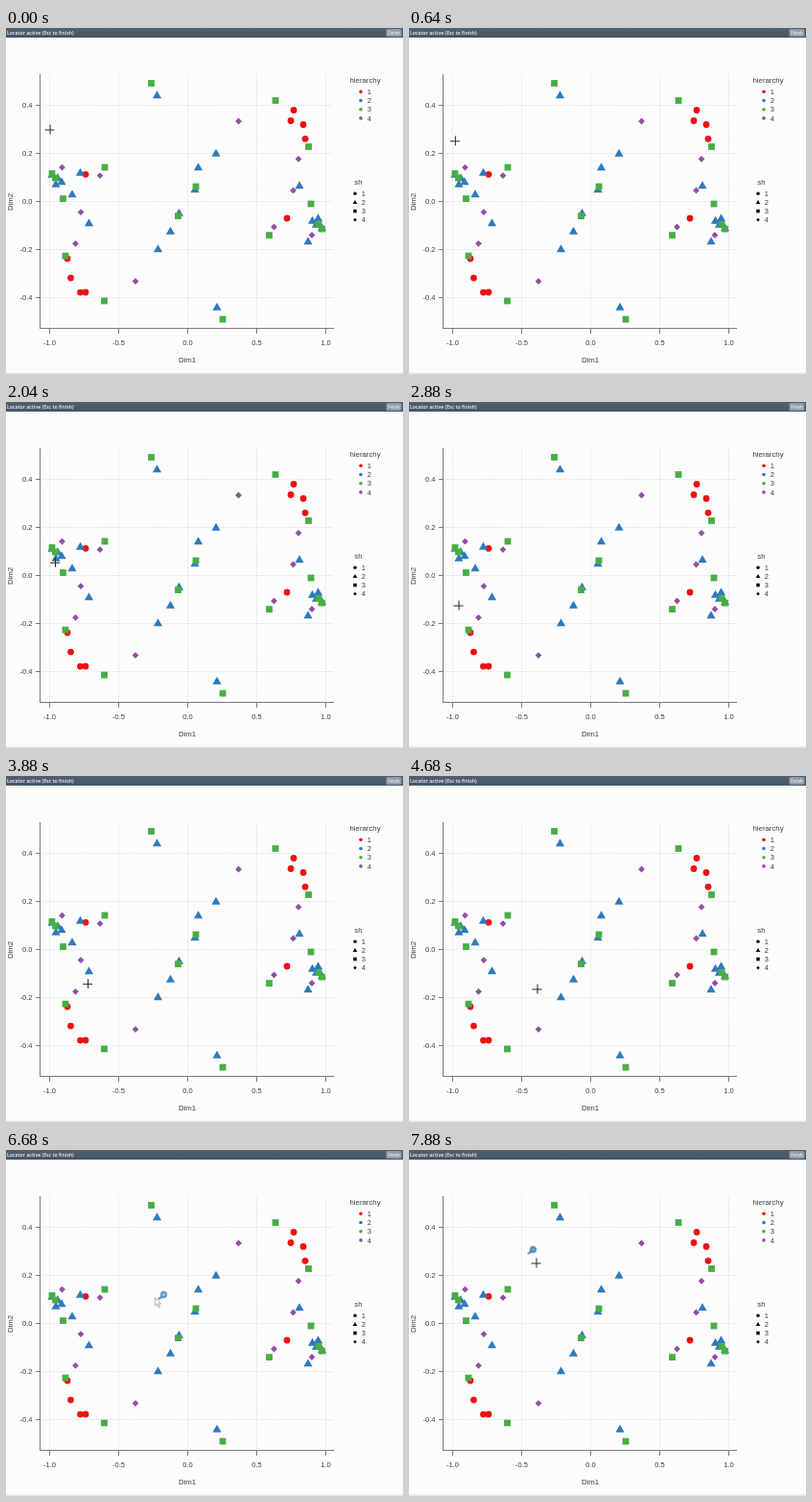
These frames come from a looping animation (414x360 px, 8 s). An HTML page:

```html
<!DOCTYPE html>
<html lang="en">
<head>
<meta charset="utf-8">
<title>Scatter plot locator</title>
<style>
html, body { margin: 0; width: 100%; height: 100%; overflow: hidden; background: #fcfcfc; }
svg { display: block; width: 414px; height: 360px; font: 7.8px "Liberation Sans", Arial, sans-serif; fill: #3c3c3c; }
.bar { font: 600 5.2px "Open Sans", "Noto Sans", sans-serif; fill: #f2f5f8; }
.grid { stroke: #d9d9d9; stroke-width: .8; stroke-dasharray: 1 1; }
.axis { stroke: #7c7c7c; fill: none; }
.mid { text-anchor: middle; }
.end { text-anchor: end; }
.small { font-size: 7.5px; }

#pointer { animation: move 8s linear infinite; }
#cross { stroke: #262626; fill: none; shape-rendering: crispEdges; animation: cross 8s step-end infinite; }
#arrow { fill: #fff; stroke: #808080; stroke-width: .7; animation: arrow 8s step-end infinite; }
#badge { animation: follow 8s linear infinite; }
#badge g { stroke: #2f73b0; stroke-width: 1.3; animation: badge 8s step-end infinite; }

@keyframes move {
  0% { transform: translate(45.5px, 105.5px); }
  17% { transform: translate(50.5px, 130.5px); }
  36% { transform: translate(51.5px, 211.5px); }
  41%, 45.5% { transform: translate(70.5px, 214.5px); }
  58.5%, 63% { transform: translate(133.5px, 221.5px); }
  73% { transform: translate(154.5px, 181.5px); }
  78%, 81.5% { transform: translate(155.5px, 161.5px); }
  83.5% { transform: translate(155.5px, 153.5px); }
  94.5%, 98% { transform: translate(133.5px, 119.5px); }
  98.5%, 100% { transform: translate(132.5px, 117.5px); }
}
@keyframes follow {
  0%, 81.5% { transform: translate(164.5px, 157px); }
  83.5% { transform: translate(164.5px, 150.5px); }
  94.5%, 98% { transform: translate(130px, 105px); }
  98.5%, 100% { transform: translate(129.5px, 103.5px); }
}
@keyframes cross {
  0% { visibility: visible; }
  81.5% { visibility: hidden; }
  92%, 100% { visibility: visible; }
}
@keyframes arrow {
  0% { visibility: hidden; }
  81.5% { visibility: visible; }
  92%, 100% { visibility: hidden; }
}
@keyframes badge {
  0% { visibility: hidden; }
  81.5% { visibility: visible; fill: #9dc0de; }
  92%, 100% { visibility: visible; fill: #6da3d0; }
}
</style>
</head>
<body>
<svg viewBox="0 0 414 360">
  <defs>
    <linearGradient id="title" x2="0" y2="1">
      <stop stop-color="#50606f"/>
      <stop offset="1" stop-color="#465665"/>
    </linearGradient>
  </defs>
  <rect width="414" height="360" fill="#fcfcfc"/>
  <rect width="414" height="10" fill="url(#title)"/>
  <rect y="358.5" width="414" height="1.5" fill="#e3e8ec"/>
  <text class="bar" x="1" y="7">Locator active (Esc to finish)</text>
  <rect x="396.5" y="1" width="16" height="8" rx="1.5" fill="#8f9aa5"/>
  <text class="bar mid" x="404.5" y="6.7" style="font-size:4.4px">Finish</text>

  <g id="plot"></g>
  <text class="mid" x="189" y="348">Dim1</text>
  <text class="mid" transform="translate(6.5 181) rotate(-90)">Dim2</text>
  <text x="358.5" y="57">hierarchy</text>
  <text x="363.3" y="163">sh</text>

  <g id="badge"><g><path d="M-5.5 4.5L-1.5 2" stroke-width="2"/><circle r="2.9"/></g></g>
  <g id="pointer">
    <path id="cross" d="M-5 0H5M0-5V5"/>
    <path id="arrow" d="M0 0V8.5L2 6.8L3.5 10.2L5 9.5L3.5 6.2H6Z"/>
  </g>
</svg>
<script>
// Most points come in pairs that mirror each other through the centre.
const centre = [188.75, 180.3];
const groups = [
  { color: '#ee1014',
    pairs: [[300, 85.5], [310, 100.5]],
    single: [[297, 96.5], [312, 115.3], [83, 152.3], [293, 198], [64, 240], [83, 275]] },
  { color: '#2f7abc',
    pairs: [[157.5, 70], [219, 130.5], [197, 168], [52, 162.5], [58, 160], [48, 152.5], [54, 156]],
    single: [[200.5, 145], [306, 164], [77.5, 150.5], [69, 173], [86.5, 203], [171.5, 211.5], [315, 222]] },
  { color: '#48ad45',
    pairs: [[151.5, 57.5], [315.5, 123.5], [103, 145], [198, 165], [318, 183], [48, 151.5], [51.5, 156]],
    single: [[281, 75.5], [102.5, 284]] },
  { color: '#9150a3',
    pairs: [[242.5, 97], [305, 136.3], [299.5, 169], [279.5, 207], [319, 215.5]],
    single: [] }
];

// Each shape is centred on x, y with r as its half size.
const shapes = [
  (x, y, r) => `M${x - r} ${y}a${r} ${r} 0 1 0 ${2 * r} 0a${r} ${r} 0 1 0 ${-2 * r} 0Z`,
  (x, y, r) => `M${x} ${y - 1.4 * r}l${1.35 * r} ${2.35 * r}h${-2.7 * r}Z`,
  (x, y, r) => `M${x - r} ${y - r}h${2 * r}v${2 * r}h${-2 * r}Z`,
  (x, y, r) => `M${x} ${y - r}l${r} ${r}l${-r} ${r}l${-r} ${-r}Z`
];
const mark = (kind, x, y, r, fill) => `<path d="${shapes[kind](x, y, r)}" fill="${fill}"/>`;
const text = (x, y, s, cls = '') => `<text class="small ${cls}" x="${x}" y="${y}">${s}</text>`;
const mirror = ([x, y]) => [2 * centre[0] - x, 2 * centre[1] - y];

let grid = '', axis = 'M35.5 48V313M35 312.5H342', labels = '', marks = '';
for (let i = 0; i < 5; i++) {
  const x = 45.5 + 72 * i, y = 80.5 + 50 * i;
  grid += `M${x} 48V312M36 ${y}H342`;
  axis += `M${x} 313v5M31 ${y}h4`;
  labels += text(x, 329.5, (i / 2 - 1).toFixed(1), 'mid');
  labels += text(27.5, y + 2.7, (0.4 - i / 5).toFixed(1), 'end');
}

groups.forEach(({ color, pairs, single }, kind) => {
  for (const [x, y] of [...pairs, ...pairs.map(mirror), ...single])
    marks += mark(kind, x, y, 3.4, color);
  const y = 66.3 + 9.2 * kind, y2 = 172.3 + 9.1 * kind;
  marks += mark(0, 370, y, 1.8, color) + text(376.7, y + 2.7, kind + 1);
  marks += mark(kind, 364, y2, 1.8, '#111') + text(370.7, y2 + 2.7, kind + 1);
});
document.getElementById('plot').innerHTML =
  `<path class="grid" d="${grid}"/><path class="axis" d="${axis}"/>${labels}${marks}`;
</script>
</body>
</html>
```
